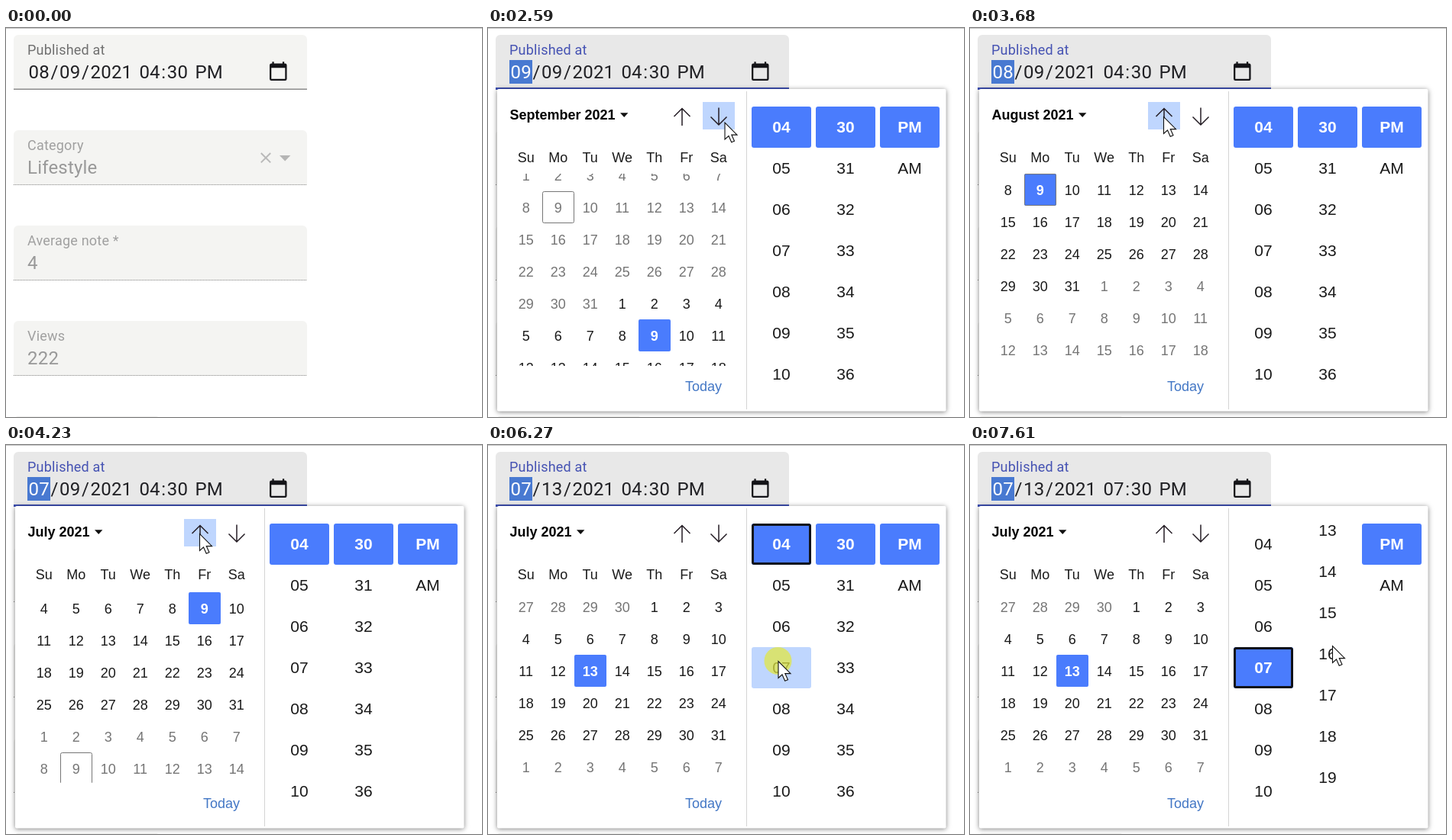
Animation of 623 by 510 pixels, one loop 8000 ms. Source, as an HTML page:

```html
<!DOCTYPE html>
<html lang="en">
<head>
<meta charset="utf-8">
<title>Date and time picker</title>
<style>
  html, body { margin: 0; width: 100%; height: 100%; overflow: hidden; background: #fff; }
  svg { display: block; }
  text { white-space: pre; }
  .form { font-family: Roboto, sans-serif; }
  .label { font-size: 18px; letter-spacing: .2px; }
  .value { font-size: 24px; letter-spacing: .2px; }
  .pop { font: 18px "Liberation Sans", Arial, sans-serif; fill: #1a1a1a; }
  .time { font-size: 21px; }
  .b { font-weight: bold; }
  .mid { text-anchor: middle; }
  .shadow { filter: drop-shadow(0 1px 3px rgba(0, 0, 0, .5)); }
</style>
</head>
<body>
<svg id="stage" width="623" height="510" viewBox="0 0 623 510"></svg>
<script>
const LOOP = 8000;
const BLUE = '#4a7cfd', PALE = '#bfd6fe', INK = '#101218', DIM = '#757575';
const OPEN = 1270, FOCUS = 1160, HOUR_FOCUS = 6270, HOUR_SET = 6400, DAY_SET = 5200, WHEEL = 7090;
const MONTHS = { 6: ['July', 116], 7: ['August', 142], 8: ['September', 173] };

// time, x, y of the pointer tip
const PATH = [
  [90, 572, 505], [860, 361, 64], [1930, 361, 64], [2140, 309.5, 123.5], [2800, 309.5, 123.5],
  [3210, 253, 116], [4340, 253, 116], [4650, 137, 317.5], [4830, 137, 317.5], [5050, 136, 297],
  [5220, 136, 297], [5640, 334, 286], [5820, 395, 280], [6050, 395, 280], [6120, 379.5, 283],
  [6420, 379.5, 283], [7040, 474, 263]
];
const CLICKS = [[1160, 1290], [2490, 2560], [3360, 3530], [3980, 4080], [5080, 5200], [6270, 6400]];
// start time, month shown, calendar scroll offset
const TURNS = [[0, 7, 0], [2499, 8, 168], [3500, 7, 0], [4040, 6, -210]];

const clamp = v => Math.max(0, Math.min(1, v));
const smooth = v => v * v * (3 - 2 * v);
const cubic = v => v < .5 ? 4 * v ** 3 : 1 - 4 * (1 - v) ** 3;
const two = n => String(n).padStart(2, '0');

const rect = (x, y, w, h, fill, more = '') =>
  `<rect x="${x}" y="${y}" width="${w}" height="${h}" fill="${fill}" ${more}/>`;
const line = (d, color, width, more = '') =>
  `<path d="${d}" fill="none" stroke="${color}" stroke-width="${width}" ${more}/>`;
const shape = (d, fill, more = '') => `<path d="${d}" fill="${fill}" ${more}/>`;
const text = (x, y, s, cls = '', fill = '') =>
  `<text x="${x}" y="${y}" class="${cls}" ${fill && `fill="${fill}"`}>${s}</text>`;
const inside = (p, x, y, w, h) => p && p.x >= x && p.x < x + w && p.y >= y && p.y < y + h;

function pointer(t) {
  if (t < PATH[0][0]) return null;
  const i = PATH.findIndex(k => k[0] > t);
  if (i < 0) return { x: 474, y: 263 };
  const [t0, x0, y0] = PATH[i - 1], [t1, x1, y1] = PATH[i];
  const e = smooth((t - t0) / (t1 - t0));
  return { x: x0 + (x1 - x0) * e, y: y0 + (y1 - y0) * e };
}

function stateAt(t) {
  let i = TURNS.length - 1;
  while (TURNS[i][0] > t) i--;
  const [start, month, to] = TURNS[i];
  const from = i ? TURNS[i - 1][2] : 0;
  return {
    t, month, p: pointer(t),
    scroll: Math.round(from + (to - from) * cubic(clamp((t - start) / 300))),
    day: t < DAY_SET ? 9 : 13,
    hour: t < HOUR_SET ? 4 : 7,
    wheel: Math.round(900 * smooth(clamp((t - WHEEL) / 510)))
  };
}

const box = (y, fill, w = 384) =>
  shape(`M10 ${y + 72}V${y + 6}a6 6 0 0 1 6 -6h${w - 12}a6 6 0 0 1 6 6v66z`, fill);

function disabledField(y, label, value) {
  return box(y, '#f4f4f2') +
    line(`M10 ${y + 71.5}H394`, '#858585', 1, 'stroke-dasharray="1 1"') +
    text(28, y + 26, label, 'label', '#a0a0a0') + text(28, y + 57, value, 'value', '#999');
}

function dateField(s) {
  const focus = s.t >= FOCUS, hover = inside(s.p, 10, 9, 384, 72);
  const parts = [two(s.month + 1), '/', two(s.day), '/', '2021', ' ', two(s.hour), ':', '30', ' ', 'PM'];
  const spans = parts.map((v, i) =>
    `<tspan dx="1.5" ${focus && !i ? 'fill="#fff"' : ''}>${v}</tspan>`).join('');
  const icon = 'M20 3h-1V1h-2v2H7V1H5v2H4a2 2 0 0 0-2 2v16a2 2 0 0 0 2 2h16a2 2 0 0 0 2-2V5a2 2 0 0 0-2-2zm0 18H4V8h16z';
  return box(9, focus ? '#e8e8e8' : hover ? '#ededec' : '#f4f4f2') +
    (focus ? rect(10, 78, 384, 3, '#3f51b5')
      : hover ? rect(10, 78, 384, 3, '#222') : rect(10, 79.5, 384, 1.5, '#8c8c8c')) +
    text(28, 35, 'Published at', 'label', focus ? '#4653b3' : hover ? '#555' : '#707070') +
    (focus ? rect(28, 42, 30, 31, '#4879d1') : '') +
    text(28, 66, spans, 'value', '#202024') +
    shape(icon, '#141418', 'transform="translate(342.8 43.2) scale(1.125)"');
}

function form(s) {
  return `<g class="form">${rect(0, 0, 623, 1, '#c6c6c6')}${dateField(s)}` +
    disabledField(134, 'Category', 'Lifestyle') +
    disabledField(259, 'Average note *', '4') +
    disabledField(384, 'Views', '222') + box(509, '#f1f1ef', 192) +
    line('M333.8 164l12.4 12.4M346.2 164l-12.4 12.4', '#b9b9b9', 2) +
    shape('M358 167h14.4l-7.2 7.4z', '#b5b5b5') + '</g>';
}

function days(s) {
  let out = '';
  for (let row = -5; row < 12; row++) {
    const y = 191 + 42 * row - s.scroll;
    if (y < 149 || y > 443) continue;
    for (let col = 0; col < 7; col++) {
      const date = new Date(2021, 7, 1 + 7 * row + col);
      const d = date.getDate(), m = date.getMonth(), x = 29 + 42 * col;
      const inMonth = m === s.month, chosen = inMonth && d === s.day;
      const ring = chosen && (s.t < 2490 || (s.t >= DAY_SET && s.t < HOUR_FOCUS));
      const hover = s.p && s.p.y >= 191 && s.p.y < 443 && inside(s.p, x, y, 42, 42);
      if (chosen || hover) out += rect(x, y, 42, 42, chosen ? BLUE : PALE, 'rx="2"');
      if (ring) out += rect(x + 1.5, y + 1.5, 39, 39, 'none', `stroke="${INK}" stroke-width="3"`);
      else if (m === 7 && d === 9)
        out += rect(x + .5, y + .5, 41, 41, 'none', 'rx="2" stroke="#767676"');
      out += text(x + 20.7, y + 28, d, chosen ? 'mid b' : 'mid', chosen ? '#fff' : inMonth ? '#1a1a1a' : DIM);
    }
  }
  return `<g clip-path="url(#grid)">${out}</g>`;
}

function timeCell(s, x, y, label, chosen, ring, canHover) {
  const hover = canHover && inside(s.p, x, y, 78, 54);
  return (chosen || hover ? rect(x, y, 78, 54, chosen ? BLUE : PALE, 'rx="3"') : '') +
    (ring ? rect(x + 1.5, y + 1.5, 75, 51, 'none', `rx="2" stroke="${INK}" stroke-width="3"`) : '') +
    text(x + 39, y + 34, label, chosen ? 'mid time b' : 'mid time', chosen ? '#fff' : '#1a1a1a');
}

function times(s) {
  let out = '';
  for (let k = 0; k < 7; k++) {
    const on = k + 4 === s.hour;
    out += timeCell(s, 345, 103 + 54 * k, two(k + 4), on, on && s.t >= HOUR_FOCUS, true);
  }
  for (let k = -18; k < 8; k++) {
    const y = 103 + 54 * k + s.wheel;
    if (y > 49 && y < 481) out += timeCell(s, 429, y, two(30 + k), !k, false, s.t < WHEEL);
  }
  out += timeCell(s, 513, 103, 'PM', true) + timeCell(s, 513, 157, 'AM', false);
  return `<g clip-path="url(#times)">${out}</g>`;
}

function popup(s) {
  if (s.t < OPEN) return '';
  const [name, caret] = MONTHS[s.month];
  const button = (x, d) =>
    (inside(s.p, x, 97, 42, 36) ? rect(x, 97, 42, 36, PALE) : '') + line(d, '#241d24', 1.5);
  const week = ['Su', 'Mo', 'Tu', 'We', 'Th', 'Fr', 'Sa']
    .map((d, i) => text(49.7 + 42 * i, 176, d, 'mid')).join('');
  return `<g class="pop" opacity="${clamp((s.t - OPEN) / 100 + .4)}">` +
    rect(12, 80, 587.5, 422.5, '#fff', 'rx="2" class="shadow"') +
    rect(338, 83, 1, 417, '#d4d4d4') +
    text(28.5, 120, name + ' 2021', 'b', '#000') +
    shape(`M${caret} 111.3h10.4l-5.2 5.7z`, '#111') +
    button(233, 'M254 128V105.5M243.5 116L254 105.5L264.5 116') +
    button(281, 'M302 104.5V127M291.5 116.5L302 127L312.5 116.5') +
    week + days(s) + text(282, 476, 'Today', 'mid', '#4377c5') + times(s) + '</g>';
}

function cursor(s) {
  if (!s.p) return '';
  const { x, y } = s.p;
  const pressed = CLICKS.some(([a, b]) => s.t >= a && s.t < b);
  return (pressed ? `<circle cx="${x}" cy="${y}" r="18" fill="rgba(226,232,64,.72)"/>` : '') +
    `<path transform="translate(${x} ${y})" d="M.5 .5V22.5L5.5 18L9.2 26.3L13 24.7L9.3 16.6H16.5Z"
      fill="#fff" stroke="#111" stroke-width="1.1"/>`;
}

const DEFS = `<defs><clipPath id="grid">${rect(13, 191, 320, 252, '#000')}</clipPath>
  <clipPath id="times">${rect(340, 103, 258, 378, '#000')}</clipPath></defs>`;
const stage = document.getElementById('stage');
let last = '';

function draw(t) {
  const s = stateAt(t);
  const markup = DEFS + form(s) + popup(s) + cursor(s);
  if (markup !== last) stage.innerHTML = last = markup;
}

const began = performance.now();
function tick() {
  draw((performance.now() - began) % LOOP);
  requestAnimationFrame(tick);
}
tick();
</script>
</body>
</html>
```
